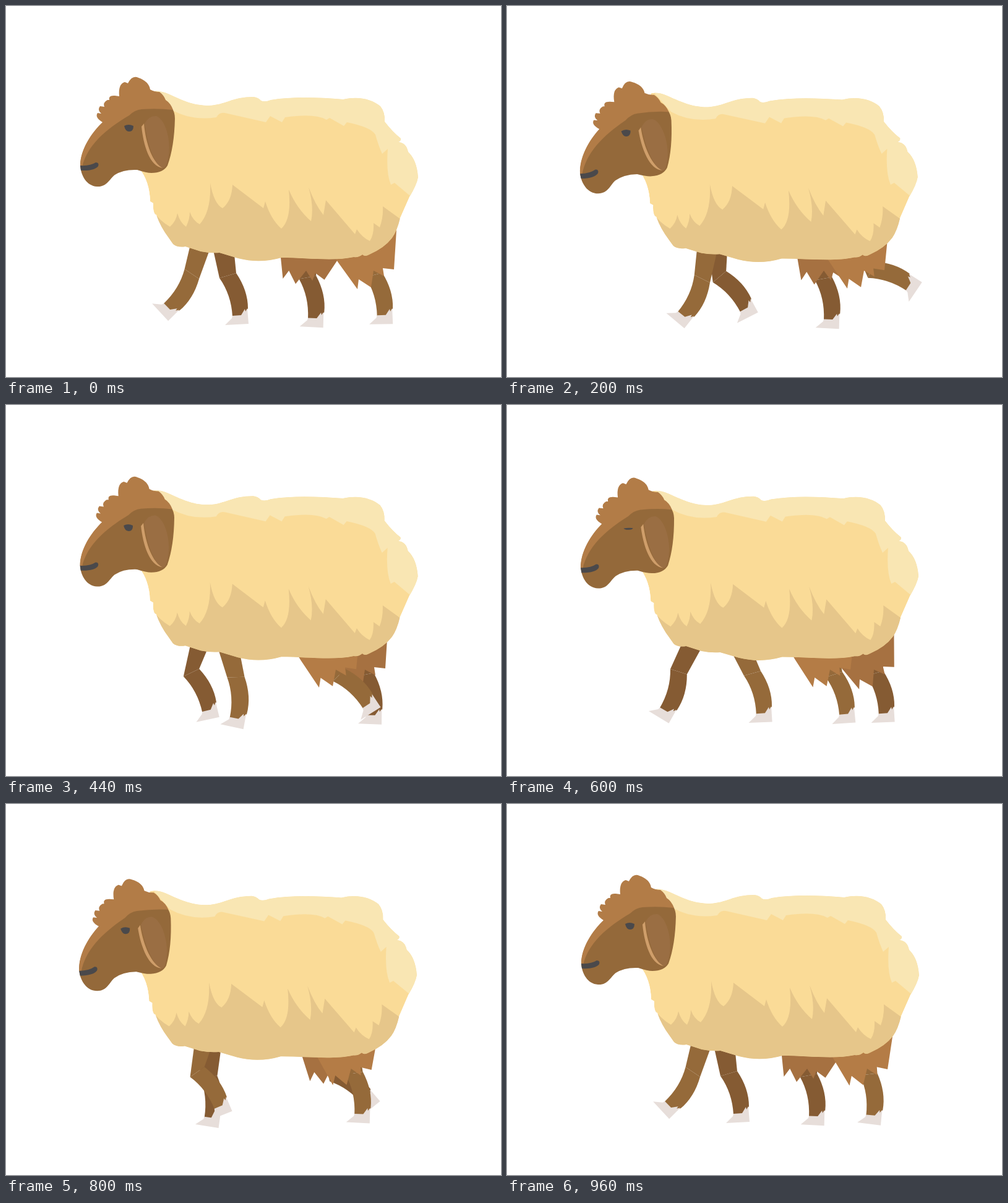
An HTML page with a canvas that plays this animation: 800x600 px, repeating every 1 s.

```html
<!DOCTYPE html>
<html lang="en">
<head>
<meta charset="utf-8">
<title>Walking sheep</title>
<style>
html, body { margin: 0; height: 100%; overflow: hidden; background: #fff; }
canvas { display: block; }
</style>
</head>
<body>
<canvas id="stage" width="800" height="600"></canvas>
<script>
const ctx = document.getElementById('stage').getContext('2d');
const LOOP = 1000, STEP = 40, RAD = Math.PI / 180;

// Key times of the gait; every leg has one row per time.
const TIMES = [0, 200, 440, 600, 760, 840, 960];

// Front legs: knee x, knee y, shin turn
const FRONT_NEAR = [[300, 433, 50], [315, 441, 43], [371, 440, 15], [396, 434, 1],
  [320, 436, -23], [303, 431, -6], [300, 433, 50]];
const FRONT_FAR = [[358, 436, 0], [343, 438, -24], [299, 433, -9], [277, 431, 34],
  [314, 440, 16], [339, 440, 9], [358, 436, 0]];

// Hind legs: knee x, knee y, shin turn, thigh x, thigh turn
const HIND_NEAR = [[594, 435, 2, 594, 0], [588, 427, -53, 577, 2], [538, 437, -29, 533, 2],
  [528, 436, -1, 522, 3], [553, 436, 5, 546, 9], [571, 435, 7, 569, 4], [584, 437, 10, 582, 5]];
const HIND_FAR = [[487, 439, 6, 485, 30], [511, 441, 6, 512, 26], [580, 436, 5, 580, 0],
  [594, 434, 1, 593, -4], [548, 435, -44, 543, 10], [515, 440, -21, 509, 26], [487, 439, 6, 485, 30]];

const NEAR = { leg: '#956a3a', wool: '#b47c46' };
const FAR = { leg: '#855b33', wool: '#a67141' };

const path = d => new Path2D(d);
const SHIN = path('M-13 4 Q6 31 8 66 L26 65 L33 53 Q33 24 14 -4 Z');
const HOOF = path('M-4 80 L34 78 L32 53 L29 58 L28 54 L22 64 L8 65 L7 69 Z');
const THIGH = path('M-75 -40 L-57 -13 L-26 30 L-24 14 L-4 27 L0 0 L17 9 L15 -4 L33 -2 L37 -65 L33 -80 Z');

const BODY = path(`M236 138 Q248 136 262 142 C290 155 305 161 328 161 C355 160 365 147 400 147
  Q408 148 412 153 Q418 156 428 152 C465 146 505 148 545 151 C570 145 592 151 605 162
  Q613 172 612 187 Q625 204 638 214 Q639 218 634 220 Q647 221 650 236 Q664 249 666 277
  Q664 289 652 309 L637 343 Q632 364 624 375 Q612 391 587 402 Q580 406 576 402
  Q570 407 562 406 C530 413 485 407 445 407 Q410 417 375 408 L345 399 Q330 400 315 397
  L290 389 Q277 391 270 385 L263 375 Q250 358 243 338 Q237 336 238 319 L233 316
  Q232 283 215 262 Z`);
const BACK = path(`M200 90 L268 168 Q300 186 340 180 Q345 171 354 173 L420 188 L427 178
  L446 188 L451 180 Q500 173 518 184 L523 181 L546 194 L551 188 Q590 196 597 208
  Q602 226 608 239 L617 231 Q614 270 622 289 L628 286 L653 307 L720 300 L700 90 Z`);
const BELLY = path(`M235 329 Q249 348 265 357 Q275 348 277 335 Q281 350 291 357
  Q297 345 297 333 Q302 347 313 353 Q332 332 330 286 Q336 320 350 327 Q365 315 366 289
  L416 327 L419 316 Q428 345 445 360 Q462 345 457 297 Q470 328 493 348 Q498 325 489 293
  Q500 322 513 338 L517 314 L564 369 L567 361 Q575 374 588 380 Q595 370 594 351
  L604 358 Q610 342 609 324 L645 350 L700 450 L200 450 Z`);

const FACE = path(`M120 258 C121 230 140 204 158 187 L215 150 L268 165 Q273 172 273 182
  Q272 228 261 258 Q254 270 235 270 Q227 270 212 265 Q190 264 176 273
  C167 280 163 293 147 292 C130 291 121 274 120 258 Z`);
const HAIR = path(`M120 258 C120 232 138 205 156 188 Q143 180 148 173 L154 174
  Q147 168 152 162 L159 163 Q156 156 164 152 L167 152 Q165 144 176 145 L183 146
  Q181 126 192 123 L197 125 Q204 111 214 116 Q231 122 233 135 Q240 139 248 139
  Q255 144 258 152 Q266 157 270 168 Q245 165 219 167 Q208 168 199 177
  C160 200 132 225 123 260 Z`);
const EAR = path('M224 190 Q231 177 243 178 C260 184 271 230 258 259 Q255 264 250 261 Q232 245 224 190 Z');
const EAR_RIM = path('M219 195 L223 190 C226 225 238 254 253 262 C232 259 222 225 219 195 Z');
const EYE = path('M191 194 Q198 190 206 194 Q206 203 199 203 Q193 203 191 194 Z');
const NOSE = path('M120 258 Q136 259 145 253 Q151 253 149 259 Q143 267 121 266 Z');

function fill(shape, color) {
  ctx.fillStyle = color;
  ctx.fill(shape);
}

// Draw with the origin at x, y, turned by some degrees.
function turned(x, y, deg, draw) {
  ctx.save();
  ctx.translate(x, y);
  ctx.rotate(deg * RAD);
  draw();
  ctx.restore();
}

// Smooth cyclic interpolation through the key rows.
function pose(rows, t) {
  const n = TIMES.length;
  const time = i => TIMES[(i + n) % n] + LOOP * Math.floor(i / n);
  let i = n - 1;
  while (TIMES[i] > t) i--;
  const span = time(i + 1) - time(i), u = (t - time(i)) / span;
  return rows[0].map((_, c) => {
    const value = k => rows[(k + n) % n][c];
    const slope = k => (value(k + 1) - value(k - 1)) / (time(k + 1) - time(k - 1)) * span;
    const a = value(i), b = value(i + 1), v = 1 - u;
    return a * (1 + 2 * u) * v * v + slope(i) * u * v * v
      + b * (3 - 2 * u) * u * u - slope(i + 1) * u * u * v;
  });
}

function limb(x, y, turn, hipX, hipY, half, color) {
  const c = Math.cos(turn * RAD), s = Math.sin(turn * RAD);
  ctx.fillStyle = color;
  ctx.beginPath();
  ctx.moveTo(hipX - half, hipY);
  ctx.lineTo(x - 13 * c - 4 * s, y - 13 * s + 4 * c);
  ctx.lineTo(x + 14 * c + 4 * s, y + 14 * s - 4 * c);
  ctx.lineTo(hipX + half, hipY);
  ctx.fill();
  turned(x, y, turn, () => {
    fill(SHIN, color);
    fill(HOOF, '#e7deda');
  });
}

function frontLeg(rows, t, tone) {
  const [x, y, turn] = pose(rows, t);
  limb(x, y, turn, 338 + 0.24 * (x - 338), 340, 20, tone.leg);
}

function hindLeg(rows, t, tone) {
  const [x, y, turn, thighX, thighTurn] = pose(rows, t);
  limb(x, y, turn, thighX, 395, 13, tone.leg);
  turned(thighX, 428, thighTurn, () => fill(THIGH, tone.wool));
}

// Two nods per loop, eased between low and high points.
function nod(t) {
  const turns = [0, 240, 500, 740, 970, 1240];
  let i = 0;
  while (turns[i + 1] <= t) i++;
  const wave = (1 - Math.cos(Math.PI * (t - turns[i]) / (turns[i + 1] - turns[i]))) / 2;
  return i % 2 ? 1 - wave : wave;
}

// Turn the drawing around a pivot.
function around(x, y, deg, draw) {
  turned(x, y, deg, () => {
    ctx.translate(-x, -y);
    draw();
  });
}

function body() {
  ctx.clip(BODY);
  fill(BODY, '#fadb97');
  fill(BACK, '#f9e6b3');
  fill(BELLY, '#e6c68a');
}

function head(t) {
  fill(FACE, '#94693a');
  fill(HAIR, '#b27c47');
  fill(EAR, '#9a6e43');
  fill(EAR_RIM, '#cf9e6a');
  fill(NOSE, '#4a494b');
  const open = Math.min(1, Math.max(0.28, Math.abs(t - 600) / 80));
  ctx.translate(0, 197);
  ctx.scale(1, open);
  ctx.translate(0, -197);
  fill(EYE, '#4a494b');
}

function draw(now) {
  const step = Math.floor(now % LOOP / STEP);
  const t = step < 2 ? 0 : step * STEP;
  const dip = nod(t);
  ctx.clearRect(0, 0, 800, 600);
  hindLeg(HIND_FAR, t, FAR);
  frontLeg(FRONT_FAR, t, FAR);
  hindLeg(HIND_NEAR, t, NEAR);
  frontLeg(FRONT_NEAR, t, NEAR);
  around(620, 550, -0.5 * dip, body);
  around(312, 292, -4.2 * dip, () => head(t));
}

let start;
function tick(now) {
  start ??= now;
  draw(now - start);
  requestAnimationFrame(tick);
}
requestAnimationFrame(tick);
</script>
</body>
</html>
```
